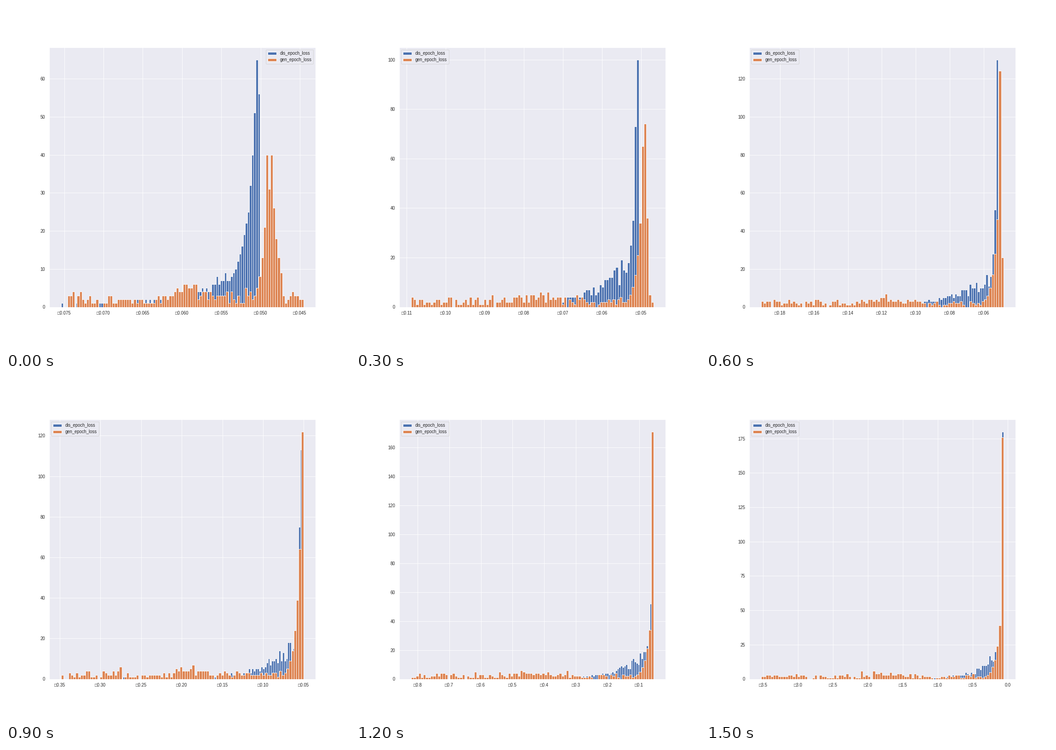
A matplotlib script for the animation above (1800 ms loop, 748 px wide and 748 px high).

```python
import numpy as np
import matplotlib.pyplot as plt
from matplotlib.animation import FuncAnimation
from matplotlib.ticker import FuncFormatter

SIZE, DPI = 748, 64
PT = 12 * DPI / SIZE  # point scale: the layout is that of a 12 inch figure
BLUE, ORANGE, PANEL, INK = "#4C72B0", "#DD8452", "#EAEAF2", "#262626"

plt.rcParams.update({
    "font.family": ["Liberation Sans", "DejaVu Sans"],
    "font.size": 11 / PT,
    "text.color": INK,
    "axes.axisbelow": True,
    "patch.linewidth": 1 / PT,
})

# Ranges are (low, high, bins). Keys are (bins from the right end, count);
# past the last key the counts fade exponentially over `fade` bins.
EPOCHS = [
    dict(decimals=3, fade=25,
         dis=(-.0754, -.05009, 95), dis_keys=[(0, 56), (1, 65), (5, 25), (12, 9)],
         gen=(-.07458, -.04454, 100),
         gen_keys=[(0, 2), (4, 4), (7, 1), (9, 9), (12, 26), (13, 40),
                   (14, 31), (15, 40), (16, 21)]),
    dict(decimals=2, fade=16,
         dis=(-.10889, -.05057, 98), dis_keys=[(0, 100), (1, 73), (2, 35), (4, 18)],
         gen=(-.10889, -.04682, 100),
         gen_keys=[(0, 2), (1, 5), (2, 36), (3, 74), (4, 65), (5, 34)]),
    dict(decimals=2, fade=18,
         dis=(-.1735, -.05155, 100), dis_keys=[(0, 130), (1, 51), (2, 28), (3, 16)],
         gen=(-.19116, -.04835, 100), gen_keys=[(0, 26), (1, 124), (2, 46)]),
    dict(decimals=2, fade=16,
         dis=(-.2727, -.0521, 100), dis_keys=[(0, 113), (1, 75), (2, 33), (3, 19)],
         gen=(-.34836, -.0503, 100), gen_keys=[(0, 122), (1, 64)]),
    dict(decimals=1, fade=14,
         dis=(-.6003, -.0557, 100), dis_keys=[(0, 150), (1, 52), (2, 29), (4, 19)],
         gen=(-.8205, -.055, 100), gen_keys=[(0, 171), (1, 34)]),
    dict(decimals=1, fade=10,
         dis=(-2.692, -.0625, 100), dis_keys=[(0, 180), (1, 35), (4, 20)],
         gen=(-3.527, -.0625, 100), gen_keys=[(0, 176), (1, 39)]),
]


def profile(k, keys, fade):
    """Geometric interpolation through the keys, then an exponential fade."""
    ks, vs = zip(*keys)
    past = np.clip(k - ks[-1], 0, None)
    return np.exp(np.interp(k, ks, np.log(vs)) - past / fade), past > 0


def dis_counts(i):
    e = EPOCHS[i]
    rng = np.random.default_rng(20 + i)
    k = np.arange(e["dis"][2])[::-1]
    n, tail = profile(k, e["dis_keys"], e["fade"])
    n[tail] *= rng.uniform(.65, 1.3, tail.sum())
    n[0] = 1
    return n.round()


def gen_counts(i):
    e = EPOCHS[i]
    rng = np.random.default_rng(40 + i)
    k = np.arange(e["gen"][2])[::-1]
    n, tail = profile(k, e["gen_keys"], 2)
    # long low tail with a gentle hump halfway
    mean = 2 + (2.5 - .2 * i) * np.exp(-((k - 47) / 10) ** 2)
    noise = rng.binomial(7, mean / 7)
    return np.where(tail, np.maximum(n, noise), n).round()


fig = plt.figure(figsize=(SIZE / DPI, SIZE / DPI), dpi=DPI, facecolor="white")
ax = fig.add_axes([.125, .125, .775, .755])


def draw_bars(span, n, color, label):
    lo, hi, bins = span
    step = (hi - lo) / bins
    ax.bar(lo + step * np.arange(bins), n, step, align="edge", color=color,
           edgecolor="white", linewidth=1 / PT, label=label)


def tick_text(decimals):
    def text(v, _):
        # negative numbers carry a hollow box in place of the minus sign
        return ("\u25a1" if v < -1e-9 else "") + f"{abs(v):.{decimals}f}"
    return FuncFormatter(text)


def draw(i):
    e = EPOCHS[i]
    dis, gen = e["dis"], e["gen"]
    d, g = dis_counts(i), gen_counts(i)

    ax.clear()
    ax.set_facecolor(PANEL)
    ax.grid(True, color="white", linewidth=1 / PT)
    ax.tick_params(length=0, pad=9.5 / PT, labelsize=11 / PT, labelcolor=INK)
    for spine in ax.spines.values():
        spine.set(color="white", linewidth=1.25 / PT)

    draw_bars(dis, d, BLUE, "dis_epoch_loss")
    draw_bars(gen, g, ORANGE, "gen_epoch_loss")

    lo, hi = min(dis[0], gen[0]), max(dis[1], gen[1])
    pad = .05 * (hi - lo)
    ax.set_xlim(lo - pad, hi + pad)
    ax.set_ylim(0, 1.05 * max(d.max(), g.max()))
    ax.xaxis.set_major_formatter(tick_text(e["decimals"]))
    ax.legend(loc="upper left" if i else "upper right", fontsize=11 / PT,
              labelspacing=.42, facecolor=PANEL, edgecolor="0.8", framealpha=.8)
    return []


anim = FuncAnimation(fig, draw, frames=len(EPOCHS), init_func=lambda: draw(0),
                     interval=300, repeat=True, repeat_delay=0, blit=False)
plt.show()
```
